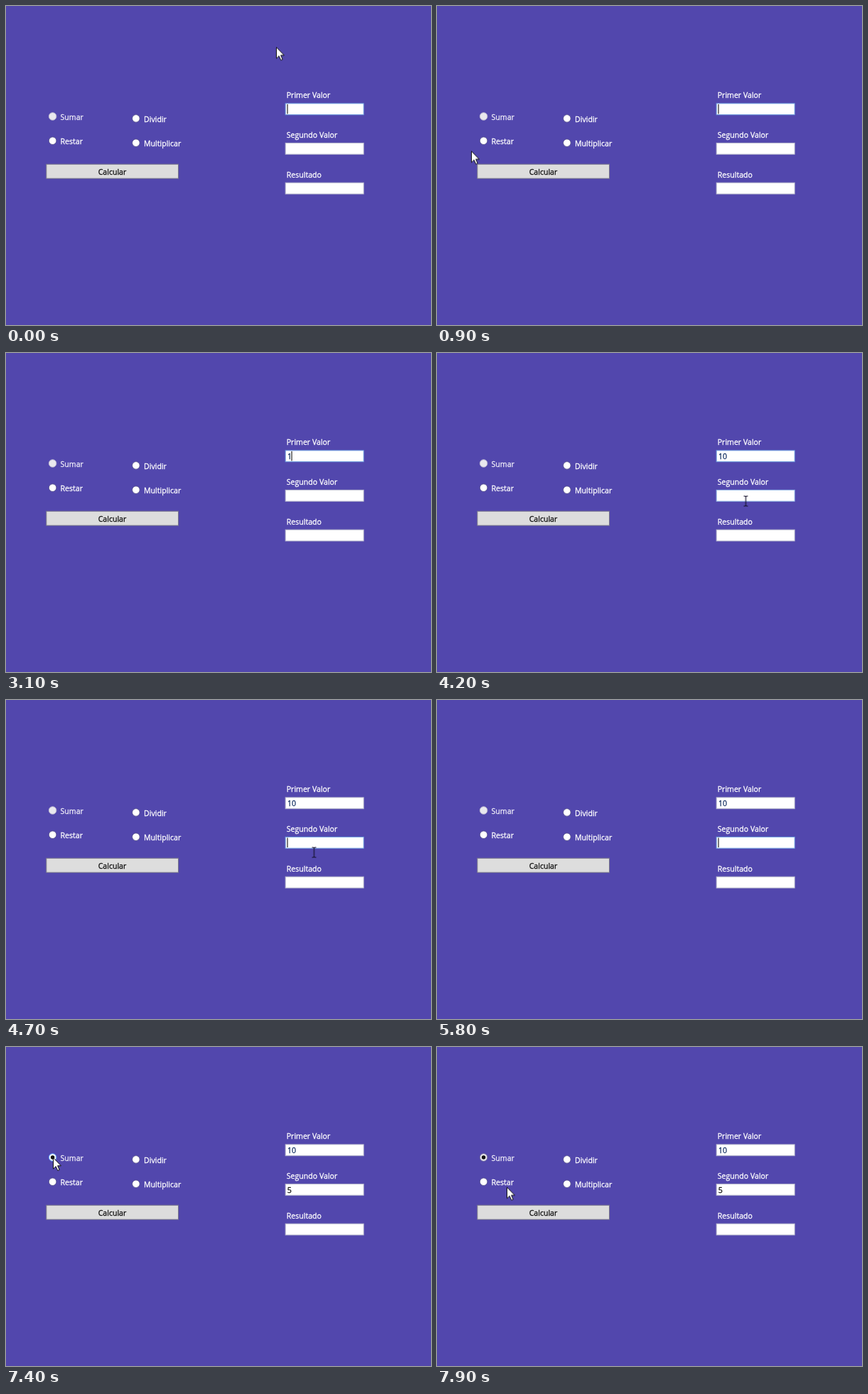
These frames come from a looping animation (598x448 px, 8 s). An HTML page:

```html
<!DOCTYPE html>
<html lang="es">
<head>
<meta charset="utf-8">
<title>Calculadora</title>
<style>
  html, body { margin: 0; width: 100%; height: 100%; overflow: hidden; background: #5247ad; }
  svg { display: block; width: 598px; height: 448px; }
  text {
    font: 10.6px "Open Sans", "Noto Sans", sans-serif;
    color: #fff; fill: currentColor; stroke: currentColor; stroke-width: .3px;
  }
  .radio { fill: #fff; stroke: #55508c; stroke-width: .9; }
  .box { fill: #fff; stroke: #b6b7cc; }
  .button { fill: #ddd; stroke: #77758a; }
  .dark { color: #111; fill: #111; }
  .dim { color: #efedf8; }
  .value { color: #163264; }
  .caret { fill: #111; }

  /* Every change is a hard step; 1% of the loop is 80 ms. */
  .anim { animation: 8s step-end infinite; }
  #arrow { animation-name: arrow; }
  #beam { animation-name: beam; }
  #caret1 { animation-name: caret1; }
  #caret2 { animation-name: caret2; }
  #box1 { animation-name: focus1; }
  #box2 { animation-name: focus2; }
  #digit1 { animation-name: digit1; }
  #digit0 { animation-name: digit0; }
  #digit5 { animation-name: digit5; }
  #sum { animation-name: sum; }
  #dot { animation-name: dot; }

  @keyframes arrow {
    0% { transform: translate(380px, 57.5px); opacity: 1; }
    3.75% { transform: translate(330px, 80px); }
    5% { transform: translate(210px, 134px); }
    6.25% { transform: translate(110px, 180px); }
    7.5% { transform: translate(62px, 200px); }
    11.25% { transform: translate(48px, 203.5px); }
    12.5% { transform: translate(70px, 194px); }
    13.75% { transform: translate(111px, 173px); }
    17.5% { transform: translate(163px, 157px); }
    20% { transform: translate(352px, 145px); opacity: 1; }
    23.75% { transform: translate(352px, 145px); opacity: 0; }
    86.25% { transform: translate(109px, 154px); opacity: 1; }
    90% { transform: translate(66px, 155px); }
    96.25% { transform: translate(80px, 172px); }
    97.5% { transform: translate(94px, 190px); }
    98.75%, 100% { transform: translate(98px, 196.5px); opacity: 1; }
  }
  @keyframes beam {
    0% { transform: translate(449.5px, 160px); opacity: 0; }
    23.75% { transform: translate(449.5px, 160px); opacity: 1; }
    28.75% { transform: translate(449.5px, 160px); opacity: 0; }
    51.25% { transform: translate(440px, 190px); opacity: 1; }
    52.5% { transform: translate(434.5px, 208px); opacity: 1; }
    53.75% { transform: translate(433.5px, 212px); opacity: 1; }
    55% { transform: translate(433.5px, 214px); opacity: 1; }
    60%, 100% { transform: translate(433.5px, 214px); opacity: 0; }
  }
  @keyframes caret1 {
    0% { opacity: 1; transform: none; }
    6.25% { opacity: 0; transform: none; }
    11.25% { opacity: 1; transform: none; }
    20% { opacity: 0; transform: none; }
    26.25% { opacity: 1; transform: none; }
    31.25% { opacity: 0; transform: none; }
    37.5% { opacity: 1; transform: none; }
    38.75% { opacity: 1; transform: translateX(6px); }
    46.25% { opacity: 1; transform: translateX(12px); }
    51.25%, 100% { opacity: 0; transform: translateX(12px); }
  }
  @keyframes caret2 {
    0% { opacity: 0; transform: none; }
    58.75% { opacity: 1; transform: none; }
    65% { opacity: 0; transform: none; }
    72.5% { opacity: 1; transform: none; }
    73.75% { opacity: 1; transform: translateX(6px); }
    92.5%, 100% { opacity: 0; transform: translateX(6px); }
  }
  @keyframes focus1 {
    0% { stroke: #6f9fe0; }
    58.75%, 100% { stroke: #b6b7cc; }
  }
  @keyframes focus2 {
    0% { stroke: #b6b7cc; }
    51.25% { stroke: #8fb2e4; }
    58.75% { stroke: #6f9fe0; }
    92.5%, 100% { stroke: #b6b7cc; }
  }
  @keyframes digit1 { 0% { opacity: 0; } 38.75%, 100% { opacity: 1; } }
  @keyframes digit0 { 0% { opacity: 0; } 46.25%, 100% { opacity: 1; } }
  @keyframes digit5 { 0% { opacity: 0; } 73.75%, 100% { opacity: 1; } }
  @keyframes dot { 0% { opacity: 0; } 92.5%, 100% { opacity: 1; } }
  @keyframes sum {
    0% { fill: #e9e8ee; stroke: #bbb7d0; }
    90% { fill: #f3f9ff; stroke: #5593ff; }
    96.25%, 100% { fill: #e9e8ee; stroke: #77729c; }
  }
</style>
</head>
<body>
<svg viewBox="0 0 598 448">
  <rect width="598" height="448" fill="#5247ad"/>

  <circle id="sum" class="radio anim" cx="65.6" cy="155" r="5.3"/>
  <circle id="dot" class="dark anim" cx="65.6" cy="155" r="2.7"/>
  <circle class="radio" cx="65.6" cy="189.2" r="5.3"/>
  <circle class="radio" cx="182.9" cy="157.9" r="5.3"/>
  <circle class="radio" cx="182.9" cy="192.2" r="5.3"/>
  <text class="dim" x="76.5" y="159.7">Sumar</text>
  <text x="76.5" y="194">Restar</text>
  <text x="194" y="162.5">Dividir</text>
  <text x="194" y="196.8">Multiplicar</text>

  <rect class="button" x="56.8" y="222.2" width="185.7" height="20"/>
  <text class="dark" x="149.5" y="236.7" text-anchor="middle">Calcular</text>

  <text x="394.7" y="128.7">Primer Valor</text>
  <text x="394.7" y="185">Segundo Valor</text>
  <text x="394.7" y="240.7">Resultado</text>
  <rect id="box1" class="box anim" x="393.2" y="136.9" width="110" height="15.8"/>
  <rect id="box2" class="box anim" x="393.2" y="192.4" width="110" height="15.8"/>
  <rect class="box" x="393.2" y="248.2" width="110" height="15.8"/>

  <text id="digit1" class="value anim" x="396" y="149">1</text>
  <text id="digit0" class="value anim" x="402" y="149">0</text>
  <text id="digit5" class="dark anim" x="395.7" y="204.8">5</text>
  <rect id="caret1" class="caret anim" x="395.5" y="138" width="1.1" height="13.5"/>
  <rect id="caret2" class="caret anim" x="395.5" y="193.5" width="1.1" height="13.5"/>

  <path id="beam" class="anim" d="M-3 -7H-1L0 -6L1 -7H3M0 -6V6M-3 7H-1L0 6L1 7H3" fill="none" stroke="#15122c" stroke-width="1.2"/>
  <path id="arrow" class="anim" d="M.5 .5V16.1L4.1 12.7L6.8 18.6L9.2 17.5L6.6 11.8H11.4Z" fill="#fff" stroke="#111" stroke-width="1"/>
</svg>
</body>
</html>
```
